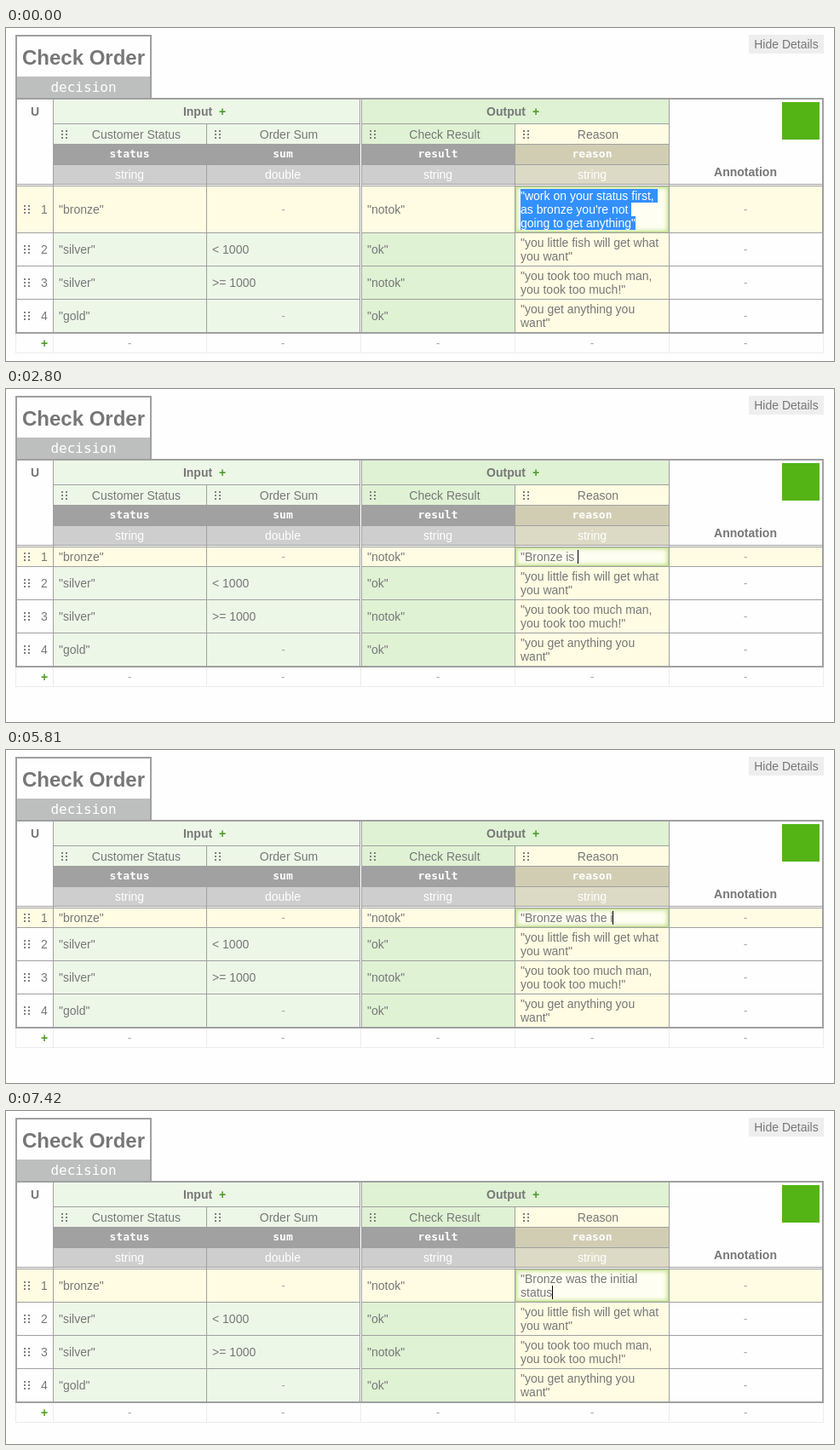
Write an HTML page that moves like this. It is 972x391 px and loops after 8000 ms.

```html
<!DOCTYPE html>
<html lang="en">
<head>
<meta charset="utf-8">
<title>Decision table</title>
<style>
  html, body { margin: 0; width: 100%; height: 100%; overflow: hidden; background: #fefefe; }
  #stage { position: relative; width: 972px; height: 391px; overflow: hidden;
    font: 14px/16px "Liberation Sans", Arial, sans-serif; color: #777; }
  #stage div { position: absolute; white-space: pre; }
  .center { width: 200px; margin-left: -100px; text-align: center; }
  .bold { font-weight: bold; }
  .title { font-weight: bold; font-size: 24px; }
  .plus { font-weight: bold; color: #4c9f26; }
  .white { color: #fff; }
  .mono { color: #fff; font: bold 13px/16px "DejaVu Sans Mono", monospace; }
  .kind { color: #fff; font: 16px/16px "DejaVu Sans Mono", monospace; }
  .faint { color: #aaa; }
  .editor { box-sizing: border-box; border: 1px solid #bcd98c; background: #fffef2;
    box-shadow: inset 0 0 5px 1px #c3e08f; }
  .selected { background: #3390ff; color: #fff; }
  .caret { display: inline-block; width: 1px; height: 16px; margin-right: -1px;
    background: #000; vertical-align: top; }
</style>
</head>
<body>
<div id="stage"></div>
<script>
const LOOP = 8000;
const LINE = '#a0a0a0', INPUT = '#edf7e8', OUTPUT = '#dff2d4', CREAM = '#fffce3';
const stage = document.getElementById('stage');

// Edit history: [time, text, caret visible]
const LONG = '"work on your status first, \nas bronze you\'re not \ngoing to get anything"';
const edits = [[840, '"', true]];
function type(base, added, times) {
  times.forEach((time, i) => {
    const text = (base + added.slice(0, i + 1)).replace(' statu', '\nstatu');
    edits.push([time, text, true]);
  });
}
type('"', 'B', [1260]);
type('"B', 'ronze ', [1610, 1680, 1820, 1890, 2030, 2100]);
type('"Bronze ', 'is the', [2520, 2660, 2800, 2940, 3080, 3150]);
edits.push([3850, '"Bronze ', true], [4340, '"Bronze ', false]);
type('"Bronze ', 'was the ', [4690, 4830, 4900, 5040, 5180, 5250, 5390, 5460]);
type('"Bronze was the ', 'initial s', [5810, 5880, 6020, 6090, 6230, 6300, 6440, 6580, 6790]);
type('"Bronze was the initial s', 'tatus', [6930, 7070, 7210, 7280, 7420]);

// Boxes are given by their edges, texts by their vertical middle.
const box = (x1, y1, x2, y2, color, cls = '') =>
  `<div class="${cls}" style="left:${x1}px;top:${y1}px;width:${x2 - x1}px;height:${y2 - y1}px;background:${color}"></div>`;
const text = (x, y, str, cls = '') =>
  `<div class="${cls}" style="left:${x}px;top:${y - 8 * str.split('\n').length}px">${str}</div>`;
const centered = (x, y, str, cls = '') => text(x, y, str, 'center ' + cls);
const hline = (x1, x2, y, color = LINE) => box(x1, y, x2, y + 1, color);
const vline = (x, y1, y2, color = LINE) => box(x, y1, x + 1, y2, color);

function frame(x1, y1, x2, y2) {
  return box(x1, y1, x2, y1 + 2, LINE) + box(x1, y2 - 2, x2, y2, LINE) +
    box(x1, y1, x1 + 2, y2, LINE) + box(x2 - 2, y1, x2, y2, LINE);
}

function handle(x, y) {
  let dots = '';
  for (let i = 0; i < 6; i++) {
    const left = x + i % 2 * 5, top = y - 5 + (i >> 1) * 4;
    dots += box(left, top, left + 2, top + 2, '#808080');
  }
  return dots;
}

// left edge, right edge, label, label centre, name, type, fill
const columns = [
  [56, 235, 'Customer Status', 153, 'status', 'string', INPUT],
  [236, 415, 'Order Sum', 332, 'sum', 'double', INPUT],
  [418, 597, 'Check Result', 515, 'result', 'string', OUTPUT],
  [598, 778, 'Reason', 695, 'reason', 'string', CREAM]
];
const rules = [
  ['"silver"', '&lt; 1000', '"ok"', '"you little fish will get what\nyou want"'],
  ['"silver"', '&gt;= 1000', '"notok"', '"you took too much man,\nyou took too much!"'],
  ['"gold"', '-', '"ok"', '"you get anything you\nwant"']
];

function header() {
  let out = box(872, 8, 960, 30, '#eeeeee') + centered(916, 19, 'Hide Details') +
    box(13, 57, 169, 83, '#bdbfbe') + frame(11, 8, 171, 84) +
    centered(91, 35, 'Check Order', 'title') + centered(91, 70, 'decision', 'kind') +
    box(56, 84, 415, 112, INPUT) + box(418, 84, 778, 112, OUTPUT) +
    centered(34, 98, 'U', 'bold') + centered(225, 98, 'Input', 'bold') +
    centered(254, 98, '+', 'plus') + centered(587, 98, 'Output', 'bold') +
    centered(622, 98, '+', 'plus') + centered(868, 169, 'Annotation', 'bold') +
    box(911, 87, 955, 131, '#54b415');
  for (const [x1, x2, label, labelX, name, kind, fill] of columns) {
    const reason = fill === CREAM, mid = Math.floor((x1 + x2) / 2);
    out += box(x1, 113, x2, 136, fill) +
      box(x1, 137, x2, 160, reason ? '#d0cdb3' : '#a1a1a1') +
      box(x1, 161, x2, 183, reason ? '#dcdac4' : '#cecece') +
      handle(x1 + 9, 125) + centered(labelX, 125, label) +
      centered(mid, 148, name, 'mono') + centered(mid, 172, kind, 'white');
  }
  return out + [112, 136, 160].map(y => hline(56, 778, y)).join('');
}

function cell(x1, x2, y, str) {
  return str === '-' ? centered((x1 + x2) / 2, y, str, 'faint') : text(x1 + 6, y, str);
}

function rule(index, y, values) {
  return handle(21, y) + text(41, y, String(index)) + centered(868, y, '-', 'faint') +
    values.map((value, i) => cell(columns[i][0], columns[i][1], y, value)).join('');
}

function table(value, caret, selected) {
  const grow = 16 * (value.split('\n').length - 1);
  const bottom = 327 + grow;
  const mark = caret ? '<span class="caret"></span>' : '';
  const content = selected ? `<span class="selected">${value}</span>` : value + mark;
  let out = header();

  for (const [x1, x2, , , , , fill] of columns) out += box(x1, 209 + grow, x2, bottom - 2, fill);
  out += box(13, 186, 958, 208 + grow, CREAM) +
    rule(1, 197 + grow / 2, ['"bronze"', '-', '"notok"']);
  rules.forEach((values, i) => {
    out += hline(13, 958, 208 + grow + 39 * i) + rule(i + 2, 228 + grow + 39 * i, values);
  });

  out += box(13, 183, 958, 186, '#fff') + hline(13, 958, 183) + hline(13, 958, 185) +
    box(415, 84, 418, bottom, '#fff') +
    [55, 415, 417, 778].map(x => vline(x, 84, bottom)).join('') +
    [235, 597].map(x => vline(x, 112, bottom)).join('') +
    frame(11, 82, 960, bottom) +
    box(598, 186, 778, 208 + grow, '', 'editor') + text(604, 197 + grow / 2, content);

  out += [11, 55, 235, 416, 597, 778, 959].map(x => vline(x, bottom, bottom + 23, '#ececec')).join('') +
    hline(11, 960, bottom + 22, '#ececec') + centered(45, bottom + 11, '+', 'plus') +
    [145, 325, 507, 688, 868].map(x => centered(x, bottom + 11, '-', 'faint')).join('');
  return out;
}

let shown;
function render(time) {
  const step = edits.filter(edit => edit[0] <= time).length;
  if (step === shown) return;
  shown = step;
  const [, value, caret] = step ? edits[step - 1] : [0, LONG, false];
  stage.innerHTML = table(value, caret, step === 0);
}

const start = performance.now();
function tick() {
  render((performance.now() - start) % LOOP);
  requestAnimationFrame(tick);
}
tick();
</script>
</body>
</html>
```
